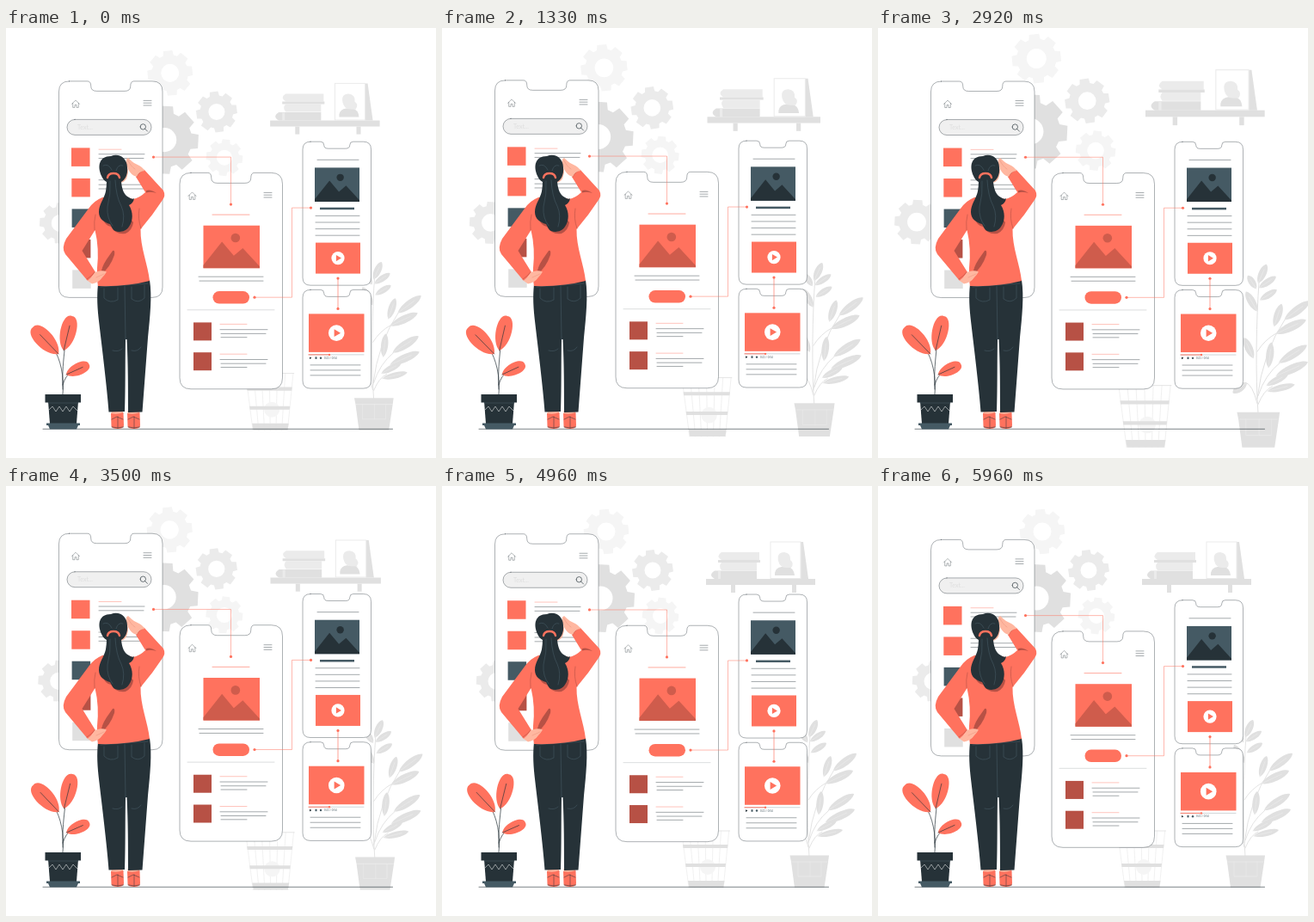
An HTML page with a canvas that plays this animation: 500x500 px, repeating every 6000 ms.

```html
<!DOCTYPE html>
<html lang="en">
<head>
<meta charset="utf-8">
<title>App layout</title>
<style>
html, body { margin: 0; width: 100%; height: 100%; overflow: hidden; background: #fff; }
canvas { display: block; width: 100vw; height: 100vh; }
</style>
</head>
<body>
<canvas id="stage"></canvas>
<script>
const LOOP = 6000, SIZE = 500;
const RED = '#ff725e', DEEP = '#cf5c4c', BRICK = '#b75145', INK = '#263238', SLATE = '#455a64', SKIN = '#ffb7a0';
const G1 = '#f5f5f5', G2 = '#ebebeb', G3 = '#e0e0e0';
const canvas = document.getElementById('stage');
const ctx = canvas.getContext('2d');
const dpr = window.devicePixelRatio || 1;
canvas.width = canvas.height = SIZE * dpr;

// ---- helpers ----
function fill(d, color) {
  ctx.fillStyle = color;
  ctx.fill(new Path2D(d));
}
function stroke(d, color, w = 0.5) {
  ctx.strokeStyle = color;
  ctx.lineWidth = w;
  ctx.stroke(new Path2D(d));
}
function rect(x, y, w, h, color) {
  ctx.fillStyle = color;
  ctx.fillRect(x, y, w, h);
}
function disc(x, y, r, color) {
  ctx.fillStyle = color;
  ctx.beginPath();
  ctx.arc(x, y, r, 0, 7);
  ctx.fill();
}
function pill(x, y, w, h, color, line) {
  ctx.beginPath();
  ctx.roundRect(x, y, w, h, h / 2);
  ctx.fillStyle = color;
  ctx.fill();
  if (line) {
    ctx.strokeStyle = line;
    ctx.lineWidth = 0.4;
    ctx.stroke();
  }
}
function hline(x1, x2, y, color = INK, w = 0.42) {
  stroke(`M${x1} ${y}H${x2}`, color, w);
}
// A larger tip makes the end of the leaf rounder.
function leaf(x1, y1, x2, y2, w, color, tip, rib) {
  ctx.save();
  ctx.translate(x1, y1);
  ctx.rotate(Math.atan2(y2 - y1, x2 - x1));
  const l = Math.hypot(x2 - x1, y2 - y1), k = w * 0.68;
  fill(`M0 0C${l * 0.2} ${-k} ${l * tip} ${-k} ${l} 0C${l * tip} ${k} ${l * 0.2} ${k} 0 0`, color);
  stroke(`M0 0H${l * 0.72}`, rib, 0.6);
  ctx.restore();
}
function gear(x, y, r, hole, color, turn) {
  const n = 8, inner = r * 0.8;
  ctx.beginPath();
  for (let i = 0; i < n; i++) {
    const a = turn + i * 2 * Math.PI / n;
    [[-0.29, inner], [-0.2, r], [0.2, r], [0.29, inner]].forEach(([da, q]) =>
      ctx.lineTo(x + q * Math.cos(a + da), y + q * Math.sin(a + da)));
  }
  ctx.closePath();
  ctx.moveTo(x + hole, y);
  ctx.arc(x, y, hole, 0, 2 * Math.PI);
  ctx.fillStyle = color;
  ctx.fill('evenodd');
}

// ---- motion ----
const PULSE = [[-20, 1], [580, 1.1], [1742, 1], [2368, 1], [2968, 1.1], [3568, 1], [6000, 1]];
function pulse(t) {
  const i = PULSE.findIndex(p => p[0] > t);
  if (i < 1) return 1;
  const [t0, a] = PULSE[i - 1], [t1, b] = PULSE[i];
  return a + (b - a) * (t - t0) / (t1 - t0);
}
const phase = t => ((t + 45) % 1500) / 1500;
const float = p => -10 * (1 - Math.abs(2 * p - 1));
const sway = p => p < 0.25 ? 4 * p : p < 0.75 ? 2 - 4 * p : 4 * p - 4;

// ---- background ----
const LEAVES = [
  [427, 292, 436, 272, 8], [425, 298, 416, 284, 7], [428, 297, 446, 285, 7], [429, 310, 447, 299, 7],
  [426, 322, 414, 301, 8], [444, 338, 452, 314, 8], [455, 331, 482, 311, 9], [446, 346, 478, 331, 9],
  [438, 382, 441, 355, 8], [449, 377, 479, 358, 9], [446, 391, 480, 376, 9], [437, 407, 466, 400, 7],
  [436, 401, 459, 389, 7], [422, 372, 412, 350, 8], [415, 398, 400, 409, 8]
];
function shelf() {
  rect(307, 108, 127, 7, G3);
  rect(336, 115, 5, 9, G3);
  rect(407, 115, 5, 9, G3);
  fill('M325 77H369V86H325Q318 81.5 325 77', G2);
  fill('M321 86H370V89H321Z', G3);
  fill('M325 89H366V98H325Q321 93 325 89', G2);
  fill('M317 98.500H366V108H317Q309 103.5 317 98.5', G3);
  rect(321, 99, 3, 9, G2);
  fill('M417 65H420L426 108H417Z', G3);
  rect(381.5, 64.5, 36, 43.5, G2);
  rect(382.5, 65.5, 34, 41.5, '#fff');
  fill('M387 104V101Q388 95 395 94H402Q409 95 410 104Z', G3);
  fill('M391 87Q389 77 398 77Q406 78 405 86Q410 90 406 95H400Q393 95 391 87', G2);
}
function basket() {
  for (let i = 0; i <= 6; i++) stroke(`M${278.5 + i * 9.2} 401L${287 + i * 6.7} 467`, G2, 0.7);
  disc(309, 443, 9, G1);
  hline(278, 334.5, 401, G3, 0.8);
  fill('M280 417H332.5L332 421H280.5Z', G3);
  fill('M283 439H330L329.5 443H283.5Z', G3);
  fill('M286 459H328.5L327 467H287.5Z', G3);
}
function tree() {
  stroke('M427 431C424 390 425 330 428 290', G3, 0.9);
  stroke('M426 415Q432 365 456 330M427 412Q434 390 450 377M427 421Q433 406 442 402M426 420Q421 400 414 398M426 365Q434 352 447 345', G3, 0.9);
  LEAVES.forEach(l => leaf(...l, G3, 0.85, G2));
  fill('M404.5 429.5H450L449 437H406Z', G3);
  fill('M406 437H449L444.5 467H410Z', G3);
  stroke('M407 437H448M414 437V454H441V437M428 437V454', G2, 0.6);
}
function background(s) {
  ctx.save();
  ctx.translate(264, 242);
  ctx.scale(s, s);
  ctx.translate(-264, -242);
  gear(191, 53, 26.5, 10.5, G1, -0.1);
  gear(184.5, 130.5, 40, 14, G3, 0.05);
  gear(245, 98, 24, 9.5, G2, -0.14);
  gear(254, 151, 21.5, 9, G1, 0.1);
  gear(63.5, 227, 24, 10, G2, 0.05);
  shelf();
  basket();
  tree();
  ctx.restore();
}

// ---- phones ----
function phone(x, y, w, h, r, notch, depth) {
  const c = x + w / 2, a = c - notch, b = c + notch, k = depth / 2;
  const d = `M${x + r} ${y}H${a - 3}Q${a + 1} ${y} ${a + 1} ${y + k}Q${a + 1} ${y + depth} ${a + k + 2} ${y + depth}` +
    `H${b - k - 2}Q${b - 1} ${y + depth} ${b - 1} ${y + k}Q${b - 1} ${y} ${b + 3} ${y}H${x + w - r}` +
    `Q${x + w} ${y} ${x + w} ${y + r}V${y + h - r}Q${x + w} ${y + h} ${x + w - r} ${y + h}H${x + r}` +
    `Q${x} ${y + h} ${x} ${y + h - r}V${y + r}Q${x} ${y} ${x + r} ${y}Z`;
  fill(d, '#fff');
  stroke(d, INK, 0.38);
}
function topBar(hx, hy, mx) {
  stroke(`M${hx - 4.5} ${hy}L${hx} ${hy - 4.5}L${hx + 4.5} ${hy}M${hx - 3.3} ${hy - 1}V${hy + 4}H${hx - 1}V${hy + 1}H${hx + 1}V${hy + 4}H${hx + 3.3}V${hy - 1}`, INK, 0.35);
  [-4, -1.2, 1.6].forEach(d => hline(mx, mx + 9, hy + d));
}
function picture(x, y, w, h, back, hill) {
  rect(x, y, w, h, back);
  const at = (u, v) => `${x + u * w} ${y + v * h}`;
  fill(`M${at(0, 1)}V${y + 0.93 * h}L${at(0.33, 0.38)}L${at(0.54, 0.71)}L${at(0.7, 0.53)}L${at(1, 0.96)}V${y + h}Z`, hill);
  disc(x + w * 0.57, y + h * 0.29, w * 0.081, hill);
}
function video(x, y, w, h, r) {
  rect(x, y, w, h, RED);
  const cx = x + w / 2, cy = y + h / 2;
  disc(cx, cy, r, '#fff');
  fill(`M${cx - r * 0.28} ${cy - r * 0.48}L${cx + r * 0.52} ${cy}L${cx - r * 0.28} ${cy + r * 0.48}Z`, RED);
}
function listPhone() {
  phone(61.5, 62.5, 120.5, 251.5, 12, 24, 11.5);
  topBar(81, 89, 160);
  pill(71, 107, 98, 18, '#f0f0f0', INK);
  ctx.fillStyle = '#dedede';
  ctx.font = '7px Lato, sans-serif';
  ctx.fillText('Text...', 83, 118.5);
  stroke('M156.1 115.5a3.2 3.2 0 1 1 6.4 0a3.2 3.2 0 1 1 -6.4 0M161.6 117.8L164.5 120.7', INK, 0.65);
  [RED, RED, SLATE, BRICK, G3].forEach((c, i) => rect(76 + i * 0.3, 140 + i * 35.5, 21.5, 21.5, c));
  for (let i = 0; i < 2; i++) {
    const y = 141.8 + i * 35.5;
    hline(108, 134, y, i ? INK : RED);
    hline(108, 161, y + 5.5);
    hline(108, 160, y + 10.3);
  }
}
function pagePhone() {
  phone(202, 169, 119.5, 251.4, 13, 24, 12);
  topBar(216.5, 196, 300);
  hline(240, 283, 217.7, RED, 0.6);
  picture(229.5, 230.3, 65.5, 49.5, RED, DEEP);
  hline(224, 299, 289.8);
  hline(225, 299, 294.7);
  pill(240.5, 306.7, 42.5, 14.5, RED);
  hline(211, 312, 328.4, '#c4c8ca', 0.6);
  for (let i = 0; i < 2; i++) {
    const y = 343 + i * 34.8;
    rect(218, y, 21, 21, BRICK);
    hline(249, 280, y + 2, RED);
    hline(249, 304, y + 8.3);
    hline(250, 302, y + 13);
    hline(250, 280, y + 17.3);
  }
}
function sidePhones() {
  phone(345, 132.8, 79.5, 167, 9, 16, 8);
  hline(362, 410, 153.9);
  picture(359, 163, 52, 39.5, SLATE, INK);
  rect(365, 209.3, 40, 2.5, SLATE);
  for (let i = 0; i < 4; i++) hline(360, 411, 219 + i * 7.6);
  video(360, 250.2, 52, 36, 7.6);

  phone(345, 305, 79.5, 114.7, 9, 16, 8);
  video(352, 333, 64.5, 44.5, 9.3);
  hline(352, 416, 380.5, '#b0b8bc', 0.6);
  hline(352, 376, 380.5, RED, 0.9);
  disc(376, 380.5, 1.2, RED);
  fill('M353 383L355.5 384.3L353 385.7Z', INK);
  rect(359.5, 383, 2, 2.5, SLATE);
  disc(366, 384.3, 1.2, SLATE);
  ctx.fillStyle = SLATE;
  ctx.font = '3px Lato, sans-serif';
  ctx.fillText('0:21 / 0:54', 370, 385.4);
  for (let i = 0; i < 3; i++) hline(354, 412, 392.5 + i * 6);
}
function links() {
  stroke('M171.5 150.7H261.5V205.7M289 313.8H332.5V209.7H354.5', RED, 0.5);
  stroke('M386 291.7V327', RED, 0.65);
  [[171.5, 150.7], [261.5, 205.7], [289, 313.8], [354.5, 209.7], [386, 291.7], [386, 327]]
    .forEach(([x, y]) => disc(x, y, 1.6, RED));
}

// ---- foreground ----
function shoe(x) {
  rect(x + 0.5, 445, 13.5, 4, SKIN);
  fill(`M${x} 448Q${x + 7} 450 ${x + 14.5} 447L${x + 15} 462Q${x + 15} 466 ${x + 8} 466Q${x + 1} 466 ${x + 0.5} 463Z`, RED);
  stroke(`M${x + 1} 455L${x + 7} 452L${x + 14} 455M${x + 8} 452V465`, INK, 0.5);
  stroke(`M${x + 1} 464Q${x + 8} 466 ${x + 14.5} 464`, INK, 0.6);
}
function pants() {
  fill('M107 298L167 293C170 312 167.5 335 165 360L158.5 446.5L142 447C142 420 142 390 140.5 362H139C138.5 390 139 420 138 446L119.5 446.500C117 415 112 375 108.5 345C106 325 105.5 312 107 298Z', INK);
  stroke('M114 303V314Q121 321 130 316V302M146 301V315Q154 321 161 314V299M110 301L165 297M138 300L139 362M124 375Q131 377 135 373M146 375Q153 377 157 371', SLATE, 0.6);
}
function sweater() {
  fill('M112 197Q102 201 96 210L70 245Q64 256 69 263L95 294Q100 290 104 284L88.500 259L103.500 235Q108.500 256 106 279Q105.500 292 107 300Q140 301 167 294C165 275 156 255 156.500 234Q171 217 182 200Q186 195 183 189L161 165Q154 166 151 173L162 191Q156 197 148 199Q130 193 112 197Z', RED);
  fill('M124 259Q127 258 126 264Q121 279 110 287Q111 278 117 269Z', BRICK);
  fill('M163 189Q168 187 175 192Q168 190 163 191.5Z', BRICK);
  stroke('M94 292Q99 289 103 284M152 173Q154 168 160 165M157 233Q153 222 155 210M103 235Q102 225 104 217', BRICK, 0.6);
}
function hands() {
  fill('M152 173Q145 171 142 164Q137 153 142 151Q146 155 149 157L155 160Q160 163 161 166Q154 167 152 173Z', SKIN);
  stroke('M142 154Q145 161 150 164', '#e8937d', 0.5);
  fill('M95 294Q100 290 103.5 284Q111 281 117 283.5Q115 287 112 290Q108 296 100 297.5Z', SKIN);
  stroke('M105 290L114 286', '#e8937d', 0.5);
}
function hair() {
  fill('M113 222Q115 230 122 231Q128 241 139 239Q147 235 148 226L140 215L118 212Z', BRICK);
  fill('M111 172C106 161 108 149 122 149C132 145 141 152 141 162C142 171 138 177 134 179C135 188 137 194 143 197Q147 200 149 198Q148 204 143 206C148 214 148 224 143 231C139 237 132 238 127 236C124 235 123 231 121 228C114 226 108 222 108 214C108 205 114 199 116 190Q117 184 117 179Q113 177 111 172Z', INK);
  stroke('M118 174Q119 169 125 169Q131 169 132 174', RED, 2.4);
  stroke('M121 178Q122 193 118 208Q117 221 124 230M127 177Q128 196 134 207Q139 218 135 231M113 160Q119 157 123 165M136 160Q130 158 128 166', SLATE, 0.6);
}
function woman() {
  shoe(122);
  shoe(141);
  pants();
  fill('M138 158Q144 163 141 172Q140 178 134 180Z', SKIN);
  sweater();
  hands();
  hair();
}
function pottedPlant(angle) {
  ctx.save();
  ctx.translate(66, 426);
  ctx.rotate(angle * Math.PI / 180);
  ctx.translate(-66, -426);
  stroke('M66 426C68 405 63 385 56 374M66 420C65 400 67 385 68 374M66 415Q69 404 76 400', INK, 0.7);
  leaf(61, 379, 31, 348, 20, RED, 1.04, INK);
  leaf(67, 375, 76.5, 335, 18, RED, 1.04, INK);
  leaf(70, 403, 96.5, 391, 14, RED, 1.04, INK);
  ctx.restore();
  fill('M49 434H84L82 460H51Z', INK);
  rect(45.5, 426, 41.5, 9.5, INK);
  hline(49, 84, 436, SLATE, 0.6);
  stroke('M50 444L54 440L58 446L62 440L66 446L70 440L74 446L78 440L83 445', '#fff', 0.5);
  fill('M47 459.5H86V462H84L82 466.5H51L49 462H47Z', SLATE);
}

function draw(t) {
  ctx.setTransform(dpr, 0, 0, dpr, 0, 0);
  rect(0, 0, SIZE, SIZE, '#fff');
  ctx.lineCap = ctx.lineJoin = 'round';
  const p = phase(t);
  background(pulse(t));
  hline(43, 449.5, 466.3, INK, 0.6);
  ctx.save();
  ctx.translate(0, float(p));
  listPhone();
  pagePhone();
  sidePhones();
  links();
  ctx.restore();
  woman();
  pottedPlant(sway(p));
}
const start = performance.now();
function tick(now) {
  draw(Math.max(0, now - start) % LOOP);
  requestAnimationFrame(tick);
}
draw(0);
requestAnimationFrame(tick);
</script>
</body>
</html>
```
